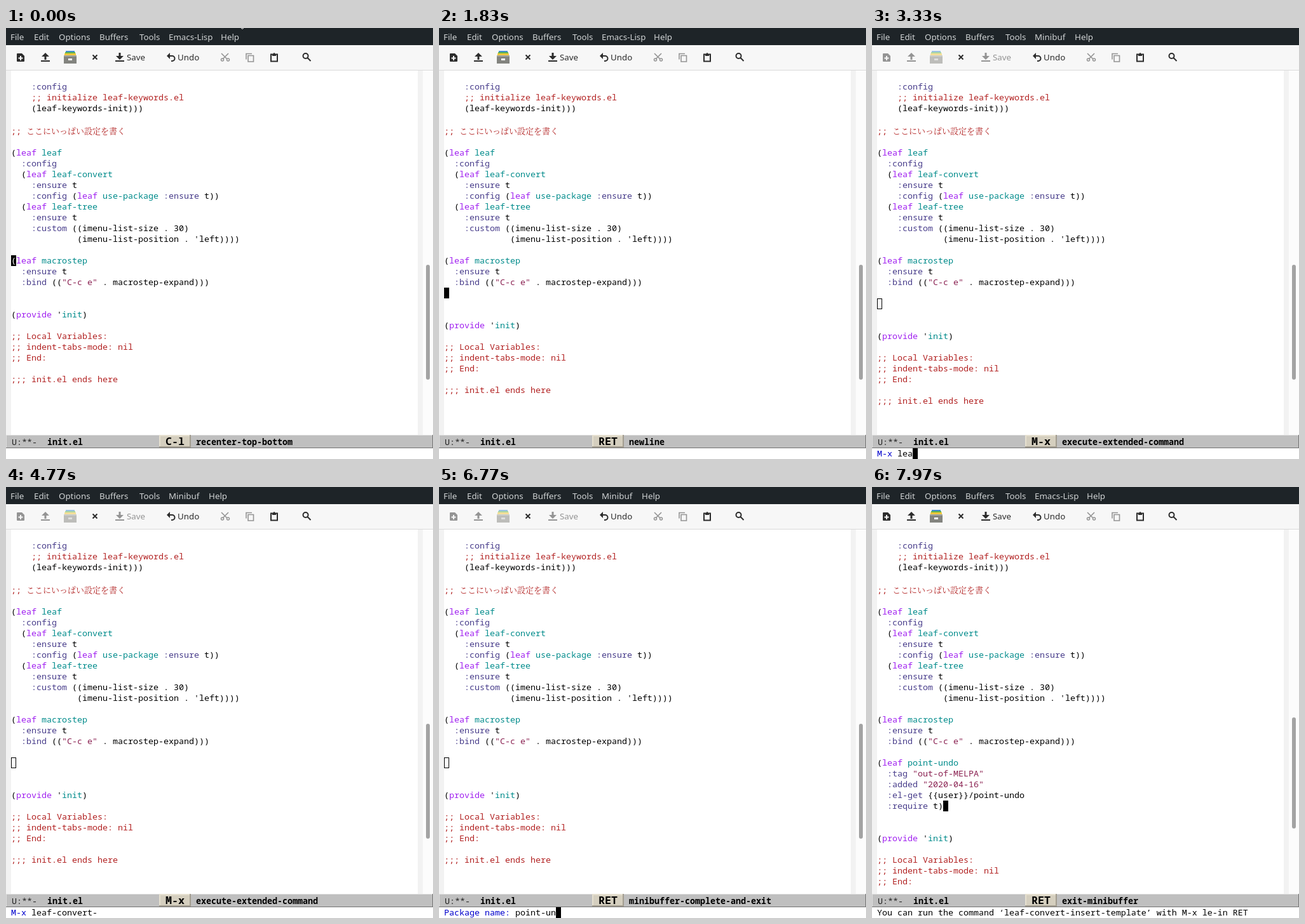
An HTML page with a canvas that plays this animation: 672 px wide and 679 px high, repeating every 8 s.

```html
<!DOCTYPE html>
<html lang="en">
<head>
<meta charset="utf-8">
<title>Editor session</title>
<style>
  html, body { margin: 0; width: 100%; height: 100%; overflow: hidden; background: #fff; }
  canvas { display: block; }
</style>
</head>
<body>
<canvas id="stage" width="672" height="679"></canvas>
<script>
const ctx = document.getElementById('stage').getContext('2d');
const LOOP = 8000, CELL = 8, LINE = 17, LEFT = 8, TOP = 67, TALL_LINE = 5;

const MONO = '"Noto Sans Mono", "Liberation Mono", monospace';
const MONO_SIZE = CELL / 0.6;
const FONT = {
  code: `${MONO_SIZE}px ${MONO}`,
  bold: `bold ${MONO_SIZE}px ${MONO}`,
  key: `bold ${MONO_SIZE * 1.25}px ${MONO}`,
  kana: '500 13px "Noto Serif CJK JP", "Noto Sans CJK JP", serif',
  ui: '13.333px "Noto Sans", sans-serif',
};
const COLOR = {
  comment: '#b22222', string: '#8b2252', keyword: '#a020f0',
  name: '#008b8b', builtin: '#483d8b', prompt: '#0000cd',
  icon: '#2c2c2c', dim: '#949494', fringe: '#f2f2f2',
};

const HEAD = `
    :config
    ;; initialize leaf-keywords.el
    (leaf-keywords-init)))

;; ここにいっぱい設定を書く

(leaf leaf
  :config
  (leaf leaf-convert
    :ensure t
    :config (leaf use-package :ensure t))
  (leaf leaf-tree
    :ensure t
    :custom ((imenu-list-size . 30)
             (imenu-list-position . 'left))))

(leaf macrostep
  :ensure t
  :bind (("C-c e" . macrostep-expand)))
`;
const TEMPLATE = `
(leaf point-undo
  :tag "out-of-MELPA"
  :added "2020-04-16"
  :el-get {{user}}/point-undo
  :require t)

`;
const TAIL = `
(provide 'init)

;; Local Variables:
;; indent-tabs-mode: nil
;; End:

;;; init.el ends here`;

// Each event changes some of the state and restarts the cursor blink.
const events = [];
const at = (time, patch) => events.push({ key: time, ...patch, time });
const type = (extra, ...steps) => steps.forEach(([time, input]) => at(time, { input, ...extra }));

at(0, { key: -130, gap: '\n', point: [17, 0], keyName: 'C-l', command: 'recenter-top-bottom',
        menu: 'Emacs-Lisp', prompt: null, input: '', canUndo: true, thumb: [373, 181], pointer: true });
at(370, { key: -130, pointer: false });
at(1200, { point: [19, 39], keyName: 'C-M-f', command: 'forward-sexp' });
at(1830, { point: [20, 0], gap: '\n\n', keyName: 'RET', command: 'newline' });
at(1970, { point: [21, 0], gap: '\n\n\n' });
at(2500, { prompt: 'M-x ', menu: 'Minibuf', keyName: 'M-x', command: 'execute-extended-command' });
type({}, [3270, 'l'], [3300, 'le'], [3330, 'lea'], [3400, 'leaf'], [3430, 'leaf-'],
  [3670, 'leaf-c'], [3770, 'leaf-co'], [3830, 'leaf-con'], [3900, 'leaf-conv'],
  [4270, 'leaf-convert-'], [4900, 'leaf-convert-i'], [5000, 'leaf-convert-in']);
at(5430, { keyName: 'RET', command: 'minibuffer-complete-and-exit', prompt: 'Package name: ', input: '' });
at(5470, { canUndo: false });
type({ canUndo: true }, [6170, 'p'], [6230, 'po'], [6300, 'poi'], [6370, 'poin'], [6430, 'point'],
  [6630, 'point-'], [6770, 'point-un'], [6870, 'point-und'], [6900, 'point-undo']);
at(7230, { command: 'exit-minibuffer' });
at(7270, { prompt: null, input: '', menu: 'Emacs-Lisp' });
at(7300, { gap: TEMPLATE, point: [25, 13], thumb: [363, 175], steady: true });
at(7970, { input: 'You can run the command ‘leaf-convert-insert-template’ with M-x le-in RET' });

const stateAt = t => Object.assign({}, ...events.filter(e => e.time <= t));

function rect(color, x, y, w, h) {
  ctx.fillStyle = color;
  ctx.fillRect(x, y, w, h);
}

// Draws a run of text and returns the x where it ends.
function write(text, x, y, color = '#000', font = FONT.code) {
  ctx.fillStyle = color;
  for (const part of text.match(/[\u3000-\uffff]+|[^\u3000-\uffff]+/g) || []) {
    ctx.font = part >= '\u3000' ? FONT.kana : font;
    ctx.fillText(part, x, y);
    x += ctx.measureText(part).width;
  }
  return x;
}

const TOKEN = /(?<comment>;.*)|(?<string>"[^"]*")|(?<builtin>:[\w-]+)|(?<keyword>(?<=\()(?:leaf|provide)(?= ))|(?<name>(?<=\(leaf |provide ')[\w-]+)/g;

function writeCode(line, y) {
  let x = LEFT, done = 0;
  for (const m of line.matchAll(TOKEN)) {
    const kind = Object.keys(m.groups).find(k => m.groups[k]);
    x = write(line.slice(done, m.index), x, y);
    x = write(m[0], x, y, COLOR[kind]);
    done = m.index + m[0].length;
  }
  write(line.slice(done), x, y);
}

const lineTop = i => TOP + LINE * i + (i > TALL_LINE ? 2 : 0);

function fillPath(color, d) {
  ctx.fillStyle = color;
  ctx.fill(new Path2D(d), 'evenodd');
}
function strokePath(color, d, width = 2) {
  ctx.strokeStyle = color;
  ctx.lineWidth = width;
  ctx.stroke(new Path2D(d));
}

function drawMenuBar(s) {
  rect('#1e2428', 0, 0, 672, 27);
  const label = (text, x) => write(text, x, 19, '#d0d3d4', FONT.ui);
  label('File', 7);
  label('Edit', 44);
  label('Options', 83);
  label('Buffers', 147);
  label('Tools', 210);
  label(s.menu, 256);
  label('Help', s.menu === 'Minibuf' ? 319 : 338);
  if (s.pointer) strokePath('#fff', 'M370 0L372 1.5L374 0', 1);
}

function drawToolBar(s) {
  const { icon, dim } = COLOR;
  const file = s.prompt ? dim : icon;
  const undo = s.canUndo ? icon : dim;
  rect('#f7f7f7', 0, 27, 672, 39);
  rect('#dadada', 0, 66, 672, 1);

  fillPath(file, 'M18 40h7l4 4v8q0 1-1 1h-10q-1 0-1-1v-11q0-1 1-1z M22 44v2.5h-2.5v2h2.5v2.5h2v-2.5h2.5v-2h-2.5v-2.5z');
  fillPath(file, 'M62 39l6 6h-4.5v5h-3v-5h-4.5z M55 51h14v2h-14z');

  ctx.globalAlpha = s.prompt ? 0.5 : 1;
  rect('#3f8fd2', 94, 36, 14, 2);
  rect('#63b548', 93, 38, 16, 2);
  rect('#f2c83c', 92, 40, 18, 3);
  rect('#a6a7a2', 91, 43, 20, 2);
  rect('#83847f', 91, 45, 20, 11);
  rect('#fff', 98, 48, 6, 3);
  ctx.globalAlpha = 1;

  strokePath(icon, 'M136.5 42.5l7 7M143.5 42.5l-7 7');

  fillPath(file, 'M177.5 39h3v5h4.5l-6 6l-6-6h4.5z M172 51h14v2h-14z');
  write('Save', 190, 51, file, FONT.ui);

  strokePath(undo, 'M256 44h5.5a4 4 0 0 1 0 8h-1.5');
  fillPath(undo, 'M253 44l5-5v10z');
  write('Undo', 270, 51, undo, FONT.ui);

  strokePath(dim, 'M339 40l9 9M350 40l-9 9', 1.6);
  strokePath(dim, 'M342.5 50a2 2 0 1 1-4 0a2 2 0 1 1 4 0M351.5 50a2 2 0 1 1-4 0a2 2 0 1 1 4 0', 1.5);
  strokePath(dim, 'M378 49.5v-9h9M381 43.5h8.5v9.5h-8.5z', 1.6);
  strokePath(icon, 'M417 41.5h10v11h-10z');
  fillPath(icon, 'M419 41h1.5q.5-2 1.5-2t1.5 2h1.5v3h-6z');
  strokePath(icon, 'M475.5 44a4 4 0 1 1-8 0a4 4 0 1 1 8 0M474.5 47l5 5');
}

function drawBuffer(s, lines) {
  rect(COLOR.fringe, 0, TOP, 8, 574);
  rect(COLOR.fringe, 648, TOP, 8, 574);
  rect('#fcfcfc', 656, TOP, 16, 574);
  ctx.fillStyle = '#a3a3a3';
  ctx.beginPath();
  ctx.roundRect(661, s.thumb[0], 6, s.thumb[1], 3);
  ctx.fill();
  lines.forEach((line, i) => writeCode(line, lineTop(i) + 13 + (i === TALL_LINE ? 2 : 0)));
}

function drawBevel(x, y, w, h, depth, face, light, dark) {
  rect(dark, x, y, w, h);
  rect(light, x, y, w - depth, h - depth);
  rect(face, x + depth, y + depth, w - 2 * depth, h - 2 * depth);
}

function drawModeLine(s) {
  rect('#fff', 0, 662, 672, 17);
  drawBevel(0, 641, 672, 21, 1, '#bfbfbf', '#dedede', '#737373');
  write('U:**-', 9, 657, '#222');
  write('init.el', 65, 657, '#000', FONT.bold);
  const keyWidth = (s.keyName.length + 2) * 10;
  drawBevel(241, 641, keyWidth, 20, 2, '#d5cfbf', '#e6e0d0', '#a39d90');
  write(s.keyName, 251, 657, '#000', FONT.key);
  write(s.command, 241 + keyWidth + CELL, 657, '#000', FONT.bold);
}

function drawCursor(s, t, lines) {
  const [row, col] = s.point;
  const x = LEFT + col * CELL, y = lineTop(row);
  const visible = s.steady || Math.floor((t - s.key) / 500) % 2 === 0;
  if (s.prompt) {
    ctx.strokeStyle = '#000';
    ctx.lineWidth = 1;
    ctx.strokeRect(x + 0.5, y + 0.5, CELL - 1, LINE - 1);
    if (visible) rect('#000', LEFT + (s.prompt + s.input).length * CELL, 662, CELL, LINE);
  } else if (visible) {
    rect('#000', x, y, CELL, LINE);
    write(lines[row][col] || '', x, y + 13, '#fff');
  }
}

function draw(t) {
  const s = stateAt(t);
  const lines = (HEAD + s.gap + TAIL).split('\n');
  rect('#fff', 0, 0, 672, 679);
  drawMenuBar(s);
  drawToolBar(s);
  drawBuffer(s, lines);
  drawModeLine(s);
  write(s.input, write(s.prompt || '', LEFT, 675, COLOR.prompt), 675);
  drawCursor(s, t, lines);
}

const start = performance.now();
function frame() {
  draw((performance.now() - start) % LOOP);
  requestAnimationFrame(frame);
}
frame();
</script>
</body>
</html>
```
